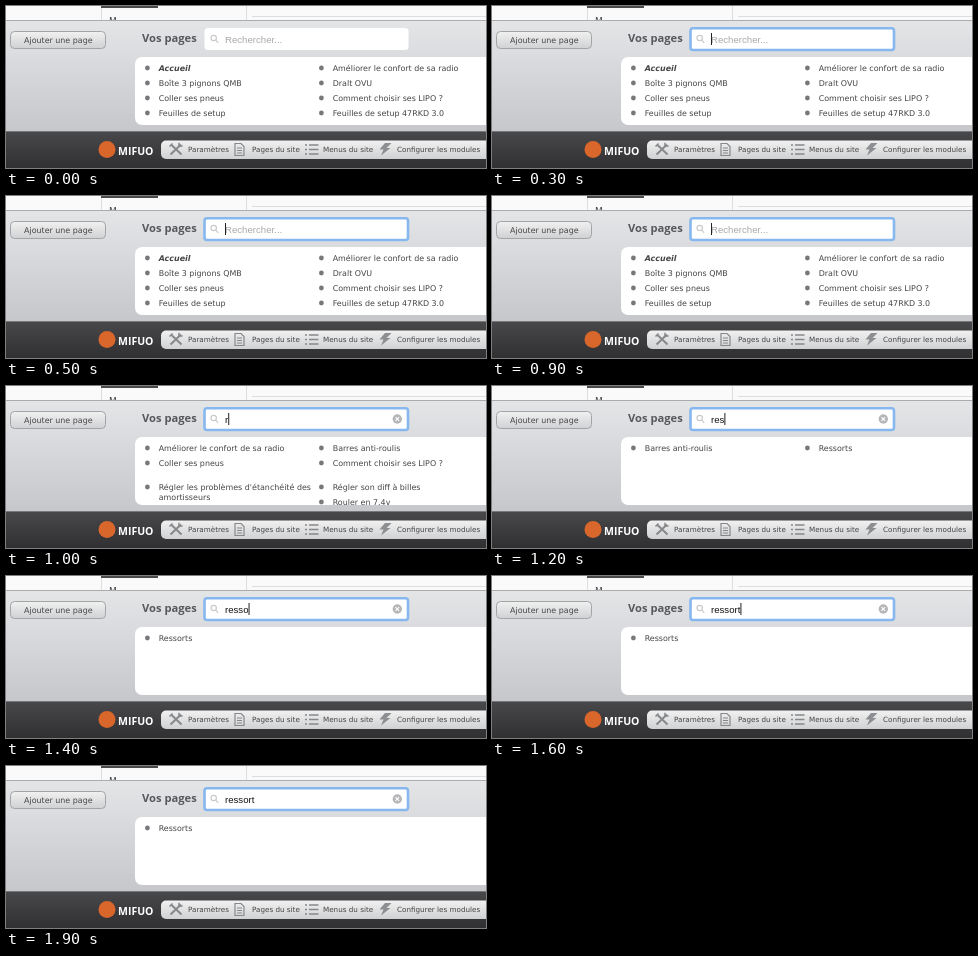
Animation, 480 px wide and 162 px high, one loop 2 s. Source, as an HTML page:

```html
<!DOCTYPE html>
<html lang="fr">
<head>
<meta charset="utf-8">
<title>Recherche de pages</title>
<style>
  html, body { margin: 0; width: 100%; height: 100%; overflow: hidden; background: #fff; }
  svg { display: block; width: 480px; height: 162px; }
  text { font: 7.95px "DejaVu Sans", sans-serif; fill: #454547; }
  .title { font: bold 11.2px "Open Sans", sans-serif; fill: #57585b; }
  .field { font: 9.65px "Liberation Sans", Arial, sans-serif; fill: #111; }
  .hint { fill: #a9a9ab; }
  .current { font-weight: bold; font-style: italic; }
  .tool { font-size: 7.2px; fill: #454547; }
  .brand { font: bold 10.5px "Open Sans", sans-serif; fill: #fff; }
  .icon { fill: none; stroke: #87888b; stroke-width: 1.5; }
</style>
</head>
<body>
<svg viewBox="0 0 480 162">
  <defs>
    <linearGradient id="panel" x2="0" y2="1">
      <stop stop-color="#e4e5e7"/><stop offset="1" stop-color="#c5c7cb"/>
    </linearGradient>
    <linearGradient id="button" x2="0" y2="1">
      <stop stop-color="#f1f1f1"/><stop offset="1" stop-color="#d0d1d3"/>
    </linearGradient>
    <linearGradient id="bar" x2="0" y2="1">
      <stop stop-color="#48484b"/><stop offset="1" stop-color="#303033"/>
    </linearGradient>
    <clipPath id="sheet"><rect x="129" y="51" width="370" height="68" rx="7"/></clipPath>
  </defs>

  <!-- page behind the panel -->
  <rect width="480" height="16" fill="#fafafa"/>
  <path d="M95.5 0V15M240.5 0V15M246 10.5H480" fill="none" stroke="#dedede"/>
  <rect x="95" width="57" height="2" fill="#4a4a4a"/>
  <text x="103" y="18" style="font-size:9px">M</text>

  <!-- panel -->
  <rect y="15" width="480" height="111" fill="url(#panel)"/>
  <path d="M0 14.5H480" stroke="#a9abae"/>
  <rect x="4.5" y="25.5" width="95" height="17" rx="4" fill="url(#button)" stroke="#a3a4a7"/>
  <text x="18" y="36.5">Ajouter une page</text>
  <text class="title" x="136" y="36.2">Vos pages</text>

  <!-- search field -->
  <rect x="198.5" y="22" width="204" height="22" rx="3.5" fill="#fff"/>
  <rect id="ring" x="198.5" y="22.2" width="203.5" height="21.8" rx="2.5" fill="none" stroke="#86b7ee" stroke-width="2.6"/>
  <g fill="none" stroke="#c9cacc" stroke-width="1.2">
    <circle cx="207.7" cy="32" r="2.7"/><path d="M209.8 34.1L212.2 36.8"/>
  </g>
  <text class="field hint" id="hint" x="219" y="36.5">Rechercher...</text>
  <text class="field" id="typed" x="219" y="36.5"></text>
  <rect id="caret" y="27" width="1" height="12" fill="#222"/>
  <g id="clear">
    <circle cx="391.3" cy="33" r="4.7" fill="#b5b6b8"/>
    <path d="M389.5 31.2l3.6 3.6m0-3.6l-3.6 3.6" stroke="#fff" stroke-width="1.1"/>
  </g>

  <!-- results -->
  <rect x="129" y="51" width="370" height="68" rx="7" fill="#fff"/>
  <g id="results" clip-path="url(#sheet)"></g>

  <!-- toolbar -->
  <rect y="126" width="480" height="36" fill="url(#bar)"/>
  <path d="M0 125.5H480" stroke="#77787b"/>
  <circle cx="101" cy="143.5" r="8.5" fill="#d9662a"/>
  <text class="brand" x="112" y="149">MIFUO</text>
  <rect x="155" y="134.5" width="340" height="18.5" rx="5" fill="url(#button)"/>
  <g class="icon">
    <path d="M165.5 139l10 9.5M175 138.5l-10.5 10" stroke-width="2"/>
    <path d="M163.5 140.5l3-3M173 136.7v3.4h3.6"/>
    <path d="M229 137.5h6l3 3v9h-9zM231 142h5M231 144.5h5M231 147h5" stroke-width="1.2"/>
    <path d="M299 139h2M299 143.5h2M299 148h2M303 139h9.5M303 143.5h9.5M303 148h9.5" stroke-width="1.3"/>
  </g>
  <path d="M379 137l-5.5 6.5h4l-2.5 6 9.5-7.5h-4l5-5z" fill="#8d8e91"/>
  <text class="tool" x="182" y="146">Paramètres</text>
  <text class="tool" x="246" y="146">Pages du site</text>
  <text class="tool" x="317" y="146">Menus du site</text>
  <text class="tool" x="391" y="146">Configurer les modules</text>
</svg>
<script>
const LOOP = 2000, FOCUS = 300, TYPING = 1000, KEY = 100, CARET_OFF = 1800;
const WORD = "ressort";
const $ = id => document.getElementById(id);

const item = (column, y, lines, style = "") => {
  const x = column ? 326.7 : 152.7;
  return `<circle cx="${x - 11.3}" cy="${y}" r="2.4" fill="#77787b"/>` +
    lines.split("|").map((line, i) =>
      `<text class="${style}" x="${x}" y="${y + 2.9 + i * 10}">${line}</text>`).join("");
};

const comfort = item(0, 62, "Améliorer le confort de sa radio");
const rollBars = item(1, 62, "Barres anti-roulis");

// Result list by number of letters typed; longer queries keep the last one.
const lists = [
  item(0, 62, "Accueil", "current") + item(0, 77, "Boîte 3 pignons QMB") +
  item(0, 92, "Coller ses pneus") + item(0, 107, "Feuilles de setup") +
  item(1, 62, "Améliorer le confort de sa radio") + item(1, 77, "Dralt OVU") +
  item(1, 92, "Comment choisir ses LIPO ?") + item(1, 107, "Feuilles de setup 47RKD 3.0"),

  comfort + rollBars + item(0, 77, "Coller ses pneus") +
  item(1, 77, "Comment choisir ses LIPO ?") +
  item(0, 101, "Régler les problèmes d'étanchéité des|amortisseurs") +
  item(1, 101, "Régler son diff à billes") + item(1, 116, "Rouler en 7.4v"),

  comfort + rollBars + item(0, 92, "Shorty VS Square"),

  item(0, 62, "Barres anti-roulis") + item(1, 62, "Ressorts"),

  item(0, 62, "Ressorts")
];

const show = (id, visible) => $(id).setAttribute("visibility", visible ? "visible" : "hidden");
let shownCount = -1;

function setLetters(count) {
  if (count === shownCount) return;
  shownCount = count;
  $("typed").textContent = WORD.slice(0, count);
  $("results").innerHTML = lists[Math.min(count, lists.length - 1)];
  const width = count ? $("typed").getComputedTextLength() : 0;
  $("caret").setAttribute("x", 219 + width);
  show("hint", !count);
  show("clear", count);
}

function draw(now) {
  const t = now % LOOP;
  const count = Math.floor((t - TYPING) / KEY) + 1;
  setLetters(Math.max(0, Math.min(WORD.length, count)));
  show("ring", t >= FOCUS);
  show("caret", t >= FOCUS && t < CARET_OFF);
}

const start = performance.now();
function tick() {
  draw(performance.now() - start);
  requestAnimationFrame(tick);
}
tick();
</script>
</body>
</html>
```
